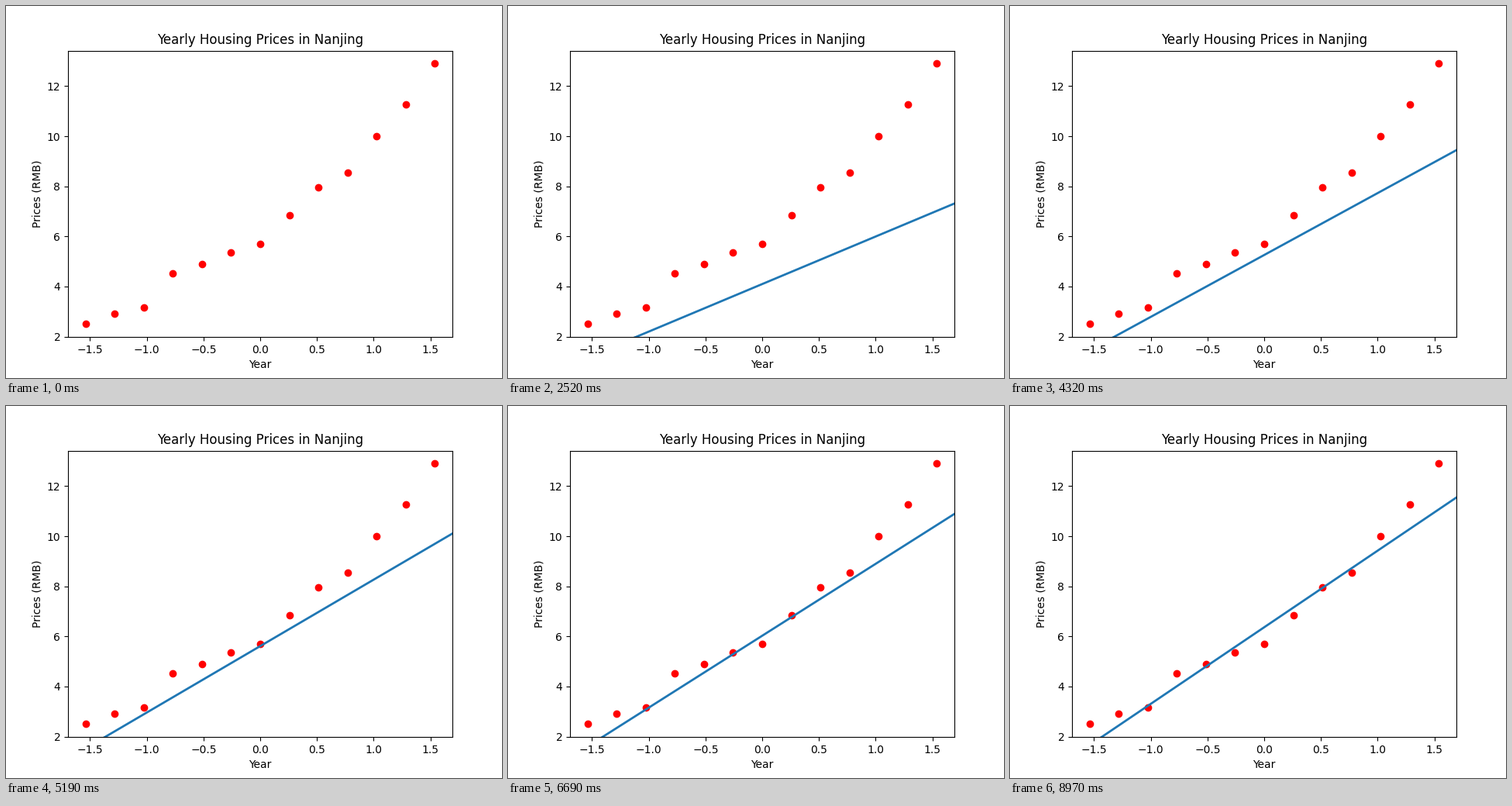
A matplotlib script for the animation above (9 s loop, 640 by 480 pixels).

```python
import numpy as np
import matplotlib.pyplot as plt
from matplotlib.animation import FuncAnimation

FRAMES = 300
INTERVAL = 30
RATE = 0.01       # gradient descent learning rate
FIRST_STEP = 11   # descent steps already taken when the loop starts

prices = np.array([2.5, 2.9, 3.147, 4.515, 4.903, 5.365, 5.704,
                   6.853, 7.971, 8.561, 10.0, 11.28, 12.9])
years = np.arange(prices.size, dtype=float)
x = (years - years.mean()) / years.std(ddof=1)


def descend(steps):
    """Intercept and slope after each step of batch gradient descent."""
    theta = np.zeros(2)
    path = [theta]
    design = np.column_stack([np.ones_like(x), x])
    for _ in range(steps):
        error = design @ theta - prices
        theta = theta - RATE * design.T @ error / x.size
        path.append(theta)
    return path


path = descend(FRAMES + FIRST_STEP)

fig, ax = plt.subplots(figsize=(6.4, 4.8), dpi=100)
ax.plot(x, prices, "ro")
ax.set_xlim(ax.get_xlim())
ax.set_ylim(ax.get_ylim())
ax.set_title("Yearly Housing Prices in Nanjing")
ax.set_xlabel("Year")
ax.set_ylabel("Prices (RMB)")

line, = ax.plot([], [], color="C0", lw=2)
ends = np.array([-2.0, 2.0])


def update(frame):
    intercept, slope = path[frame + FIRST_STEP]
    line.set_data(ends, intercept + slope * ends)
    return line,


anim = FuncAnimation(fig, update, frames=FRAMES, interval=INTERVAL,
                     repeat=True, repeat_delay=0, blit=False)
plt.show()
```
